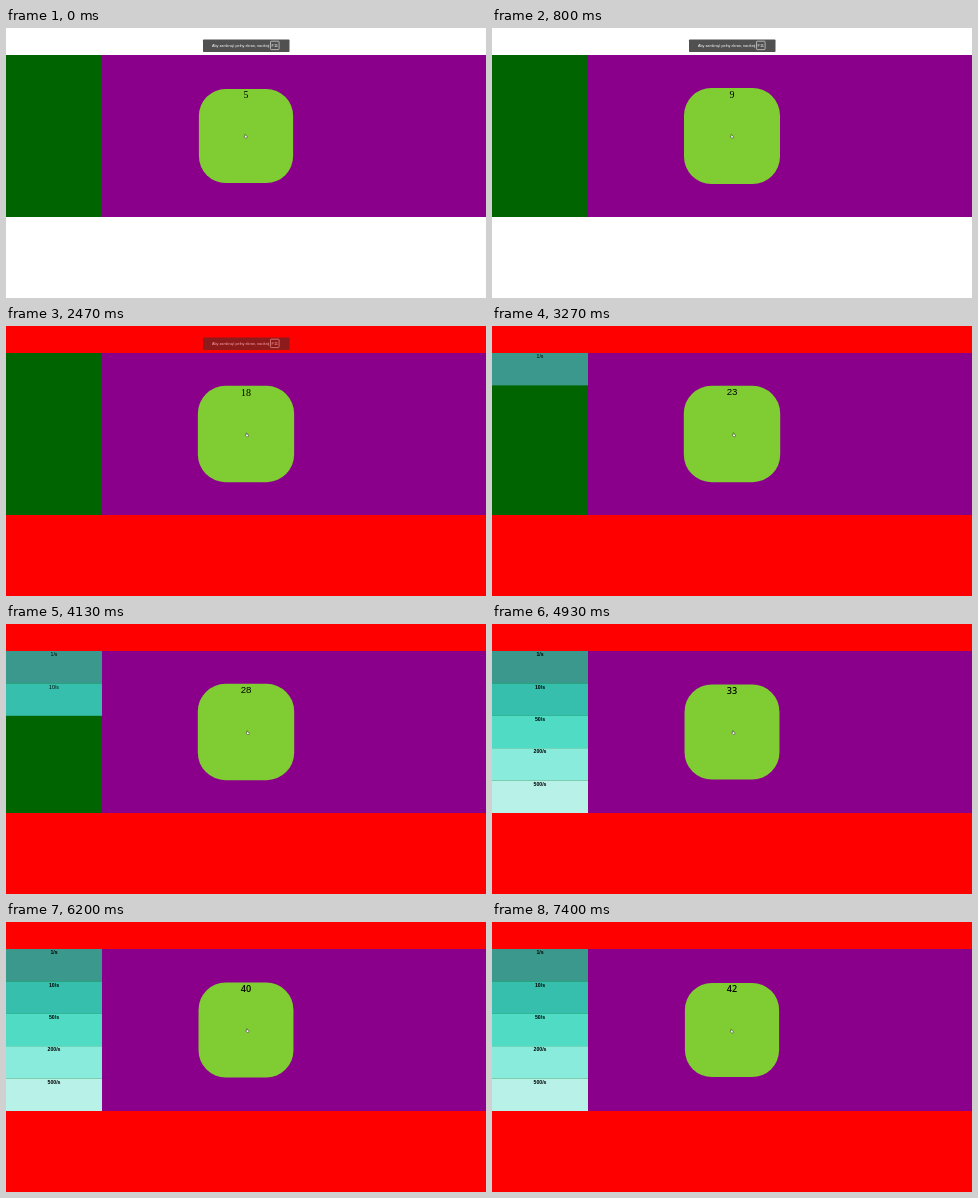
An HTML page for the animation above (7940 ms loop, 480 by 270 pixels).

```html
<!DOCTYPE html>
<html lang="pl">
<head>
<meta charset="utf-8">
<title>Clicker</title>
<style>
  html, body { margin: 0; width: 100%; height: 100%; overflow: hidden; background: #fff; }
  svg { display: block; width: 480px; height: 270px; }
  text { text-anchor: middle; font-family: "Liberation Sans", Arial, sans-serif; }
  .bold text { font-weight: 600; }
  .row text { font-size: 5.2px; }
  #toast text { font-size: 4px; fill: #fff; }
</style>
</head>
<body>
<svg viewBox="0 0 480 270">
  <rect id="page" width="480" height="270"/>
  <rect y="27" width="480" height="162" fill="#8b008b"/>
  <rect y="27" width="96" height="162" fill="#006400"/>
  <g id="shop"></g>
  <g id="button">
    <rect x="-48" y="-48" width="96" height="96" rx="27.5" fill="#7fcd32"/>
    <text id="count" y="-38.4"></text>
  </g>
  <g id="toast">
    <rect x="197" y="11.5" width="86.5" height="12.5" rx=".8" fill="#323232" fill-opacity=".85"/>
    <text x="234.7" y="19.2" textLength="auto" style="font-size:3.75px">Aby zamknąć pełny ekran, naciśnij</text>
    <rect x="264.5" y="13.2" width="8.6" height="8.4" rx=".8" fill="none" stroke="#ddd" stroke-width=".7"/>
    <text x="268.8" y="18.8">F11</text>
  </g>
  <path id="cursor" d="M-.9-2 L-.2-2 L.1-.7 L1.6-.1 L1.3 1.7 L-.5 1.7 L-1.7.2 L-.9.1Z"
        fill="#fff" stroke="#333" stroke-width=".5"/>
</svg>
<script>
const LOOP = 7940;
const $ = id => document.getElementById(id);

// [ms, clicks so far]
const CLICKS = [[0, 5], [930, 10], [1330, 12.5], [2470, 18.6], [3270, 23.5],
                [4930, 33.1], [6200, 40.1], [6530, 42], [LOOP, 42]];
// [ms, x, y]
const CURSOR = [[0, 239.7, 108.3], [1730, 240.2, 108.4], [2470, 241, 109],
                [3270, 242, 108.9], [4930, 241.4, 108.7], [7400, 241.4, 108.7]];

const UPGRADES = [
  { at: 20, label: '1/s', color: '#3a998c' },
  { at: 25, label: '10/s', color: '#36bfac' },
  { at: 30, label: '50/s', color: '#4fdbc4' },
  { at: 31, label: '200/s', color: '#88ebdc' },
  { at: 32, label: '500/s', color: '#b8f1e8' }
];
const ROW_HEIGHT = 162 / UPGRADES.length;

$('shop').innerHTML = UPGRADES.map(({ label, color }, i) => {
  const y = 27 + i * ROW_HEIGHT;
  return `<g class="row"><rect y="${y}" width="96" height="${ROW_HEIGHT}" fill="${color}"/>
    <text x="48" y="${y + 5.1}">${label}</text></g>`;
}).join('');
const rows = [...$('shop').children];

const clamp = v => Math.max(0, Math.min(1, v));

function sample(keys, t, column = 1) {
  const i = Math.max(1, keys.findIndex(k => k[0] >= t));
  const [a, b] = [keys[i - 1], keys[i]];
  return a[column] + (b[column] - a[column]) * clamp((t - a[0]) / (b[0] - a[0]));
}

function numberFont(n) {
  if (n < 20) return '10px "Liberation Serif", Times, serif';
  if (n < 30) return '9.6px "Liberation Sans", Arial, sans-serif';
  return '600 9.2px "Open Sans", sans-serif';
}

function draw(t) {
  const clicks = sample(CLICKS, t);
  const n = Math.floor(clicks + 1e-6);
  const size = 94.2 + 2.2 * Math.sin(Math.PI * Math.max(0, clicks - n));

  $('page').setAttribute('fill', n < 10 ? '#fff' : '#f00');
  $('button').setAttribute('transform', `translate(240 108) scale(${size / 96})`);
  $('count').textContent = n;
  $('count').style.font = numberFont(n);
  rows.forEach((row, i) => row.style.display = n >= UPGRADES[i].at ? '' : 'none');
  $('shop').setAttribute('class', n >= 30 ? 'bold' : '');
  $('toast').style.opacity = t < 2470 ? 1 - 0.35 * clamp((t - 1900) / 570)
                                      : 0.65 * clamp((2720 - t) / 250);

  const [x, y] = t >= 7400 ? [239.8, 109.2] : [sample(CURSOR, t, 1), sample(CURSOR, t, 2)];
  $('cursor').setAttribute('transform', `translate(${x} ${y})`);
}

const start = performance.now();
function tick() {
  draw((performance.now() - start) % LOOP);
  requestAnimationFrame(tick);
}
tick();
</script>
</body>
</html>
```
